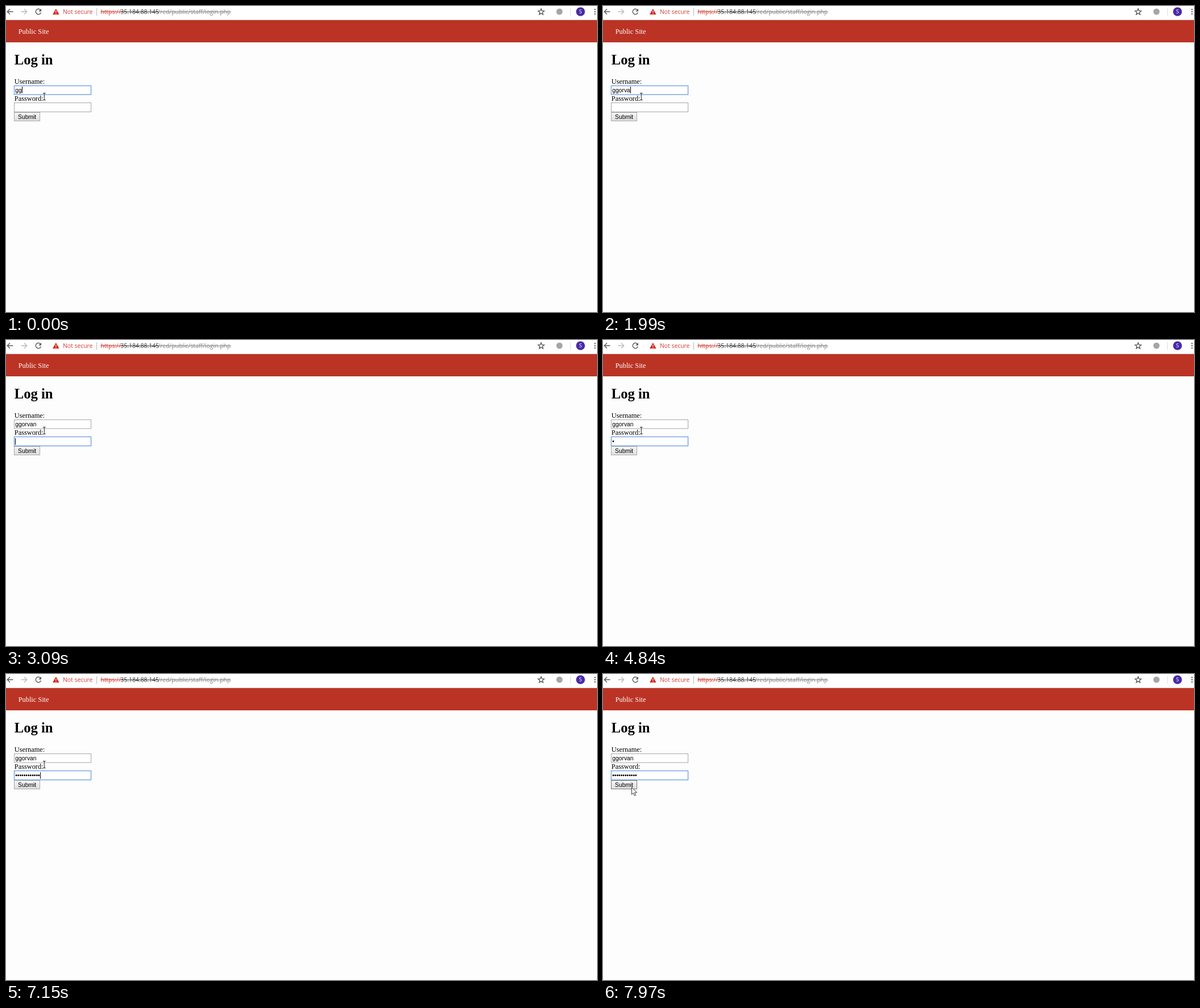
An HTML page that plays this animation: 1039x539 px, repeating every 8000 ms.

```html
<!DOCTYPE html>
<html lang="en">
<head>
<meta charset="utf-8">
<title>Log in</title>
<style>
  html, body { margin: 0; width: 100%; height: 100%; overflow: hidden; background: #fdfdfd; }
  svg { display: block; }
  .bar { font: 10.4px "Open Sans", "Noto Sans", sans-serif; }
  .bar tspan { text-decoration: line-through; }
  .page { font: 12.35px "Liberation Serif", serif; }
  .title { font: bold 24.6px "Liberation Serif", serif; }
  .field { font: 10.35px "Liberation Sans", sans-serif; }
  .line { fill: none; stroke: #5a5a5a; stroke-width: 1.4; }
  .box { fill: #fff; stroke: #a6a6a6; }
  .box.focus { stroke: #75a0e4; stroke-width: 1.4; }
  #button { fill: url(#face); stroke: #a8a8a8; }
  #button.hover { stroke: #777; }
</style>
</head>
<body>
<svg width="1039" height="539">
  <defs>
    <linearGradient id="face" x2="0" y2="1"><stop stop-color="#f6f6f6"/><stop offset="1" stop-color="#dedede"/></linearGradient>
    <path id="back" d="M5 0h-10M-.5-4.7-5.2 0l4.7 4.7"/>
  </defs>

  <!-- Browser bar -->
  <rect width="1039" height="24" fill="#fff"/>
  <rect y="24" width="1039" height="1" fill="#d0c4c3"/>
  <use href="#back" class="line" transform="translate(7.5 10)"/>
  <use href="#back" class="line" transform="translate(31.5 10) scale(-1 1)" opacity=".42"/>
  <path class="line" d="M60.4 6.8A4.7 4.7 0 1 0 61.4 11.5"/>
  <path d="M62 4.7v4.8h-4.8z" fill="#5a5a5a"/>
  <path d="M87.8 4.8 93.6 15H82z" fill="#d5281f"/>
  <path d="M87.8 8.2v3.3m0 1v1.4" stroke="#fff" stroke-width="1.1"/>
  <path d="M159.5 4v13" stroke="#b5b5b5"/>
  <path d="M992.5 4v13" stroke="#dcdcdc"/>
  <g class="bar">
    <text x="100" y="14" fill="#d23f31">Not secure</text>
    <text y="14"><tspan x="166.3" fill="#d23f31">https://</tspan><tspan x="201.3" fill="#333">35.184.88.145</tspan><tspan x="267.3" fill="#85858c">/red/public/staff/login.php</tspan></text>
  </g>
  <polygon id="star" class="line" transform="translate(940.8 10.4)"/>
  <circle cx="973" cy="10" r="5.5" fill="#a5a5a5"/>
  <circle cx="1010" cy="10" r="7.8" fill="#4a2aa6"/>
  <text x="1010" y="13.2" font-size="9" font-family="Open Sans, sans-serif" text-anchor="middle" fill="#fff">S</text>
  <path d="M1035.5 6v8.1" stroke="#5a5a5a" stroke-width="2.4" stroke-linecap="round" stroke-dasharray="0 4"/>

  <!-- Page -->
  <rect y="25" width="1039" height="39" fill="#bb3324"/>
  <g class="page">
    <text x="21.7" y="49" fill="#fff">Public Site</text>
    <text class="title" x="14.8" y="103">Log in</text>
    <text x="14.8" y="137">Username:</text>
    <text x="14.8" y="167.3">Password:</text>
  </g>
  <rect id="userBox" class="box" x="14.5" y="140.5" width="135" height="15.5"/>
  <rect id="passBox" class="box" x="14.5" y="170.5" width="135" height="16"/>
  <rect id="button" x="14.5" y="187.5" width="45" height="15"/>
  <g class="field">
    <text id="user" x="16.2" y="152"></text>
    <text id="pass" x="16.2" y="182.4"></text>
    <text x="37.1" y="198.6" text-anchor="middle">Submit</text>
  </g>
  <rect id="caret" width="1" height="11.5"/>
  <path id="beam" d="M65 153.5h4.6m-2.3 0v12m-2.3 0h4.6" fill="none" stroke="#222"/>
  <path id="arrow" d="M.5.8v12.5l2.9-2.7 2 4.7 2.2-.9-2-4.6h4z" fill="#fff" stroke="#222" stroke-width=".9"/>
</svg>
<script>
const LOOP = 8000, BLINK = 515, NAME = "ggorvan";
const LETTERS = [440, 560, 1280, 1990, 2120];  // key times after the first two letters
const TAB = 3090, FIRST_DOT = 4280, ERASE = 5270, PASTE = 6110, MOVE = 7300;
const RESTARTS = [0, ...LETTERS, TAB, FIRST_DOT, PASTE];  // times that make the caret solid again

const $ = id => document.getElementById(id);
const show = (el, on) => el.setAttribute("visibility", on ? "visible" : "hidden");

$("star").setAttribute("points", Array.from({ length: 10 }, (_, i) => {
  const r = i % 2 ? 2.5 : 5.6, a = i * Math.PI / 5;
  return [r * Math.sin(a), -r * Math.cos(a)];
}).join(" "));

// The pointer swoops below the button and settles on it, in five coarse steps.
function pointerAt(t) {
  const left = 1 - Math.min(4, Math.floor((t - MOVE + 10) / 136)) / 4;
  return [50 + 10 * left ** 3, 199 + 16 * left ** 2 - 22 * left ** 6];
}

function draw(t) {
  const inPassword = t >= TAB, moving = t >= MOVE;
  const dots = t >= PASTE ? 12 : t >= FIRST_DOT && t < ERASE ? 1 : 0;
  $("user").textContent = NAME.slice(0, 2 + LETTERS.filter(key => key <= t).length);
  $("pass").textContent = "•".repeat(dots);
  $("userBox").classList.toggle("focus", !inPassword);
  $("passBox").classList.toggle("focus", inPassword);

  const active = inPassword ? $("pass") : $("user");
  const width = active.textContent ? active.getComputedTextLength() : 0;
  const sinceKey = t - RESTARTS.findLast(time => time <= t);
  $("caret").setAttribute("x", Math.round(16.2 + width));
  $("caret").setAttribute("y", inPassword ? 173 : 142);
  show($("caret"), Math.floor(sinceKey / BLINK) % 2 === 0);

  show($("beam"), !moving);
  show($("arrow"), moving);
  const [x, y] = pointerAt(Math.max(t, MOVE));
  $("arrow").setAttribute("transform", `translate(${x} ${y})`);
  $("button").classList.toggle("hover", moving && x < 60 && y < 203);
}

const begin = performance.now();
function tick() {
  draw((performance.now() - begin) % LOOP);
  requestAnimationFrame(tick);
}
tick();
</script>
</body>
</html>
```
